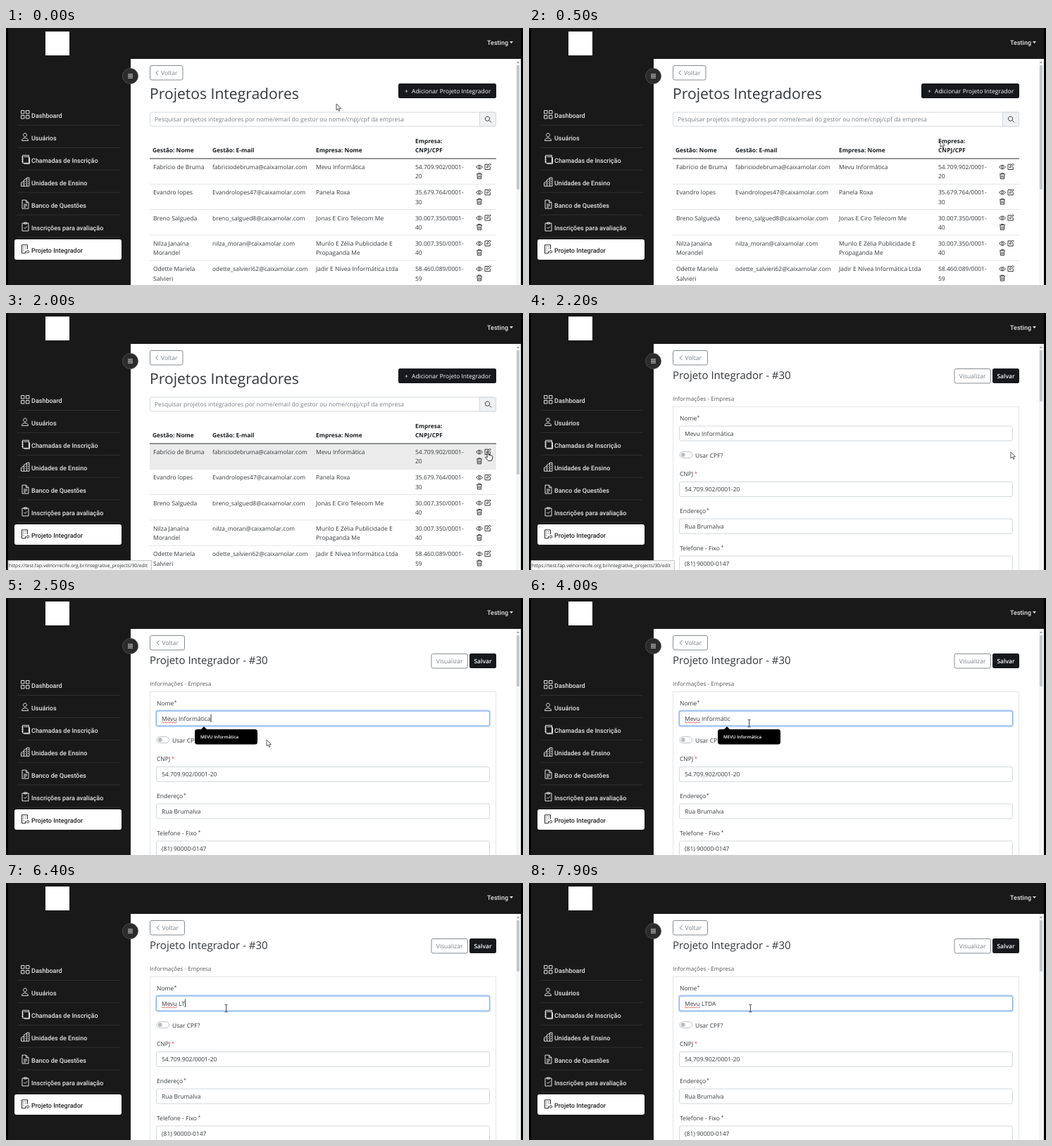
An HTML page that plays this animation: 734 px wide and 366 px high, repeating every 8 s.

```html
<!DOCTYPE html>
<html lang="pt-BR">
<head>
<meta charset="utf-8">
<title>Projetos Integradores</title>
<style>
html, body { margin: 0; width: 100%; height: 100%; overflow: hidden; background: #000; }
svg { display: block; width: 734px; height: 366px; }
text { font-family: "Open Sans", "Noto Sans", sans-serif; font-size: 8.5px; fill: #33373b; white-space: pre; text-rendering: geometricPrecision; }
.side text { font-family: Roboto, sans-serif; font-size: 9px; font-weight: 500; fill: #e6e6e6; }
.side text.on { fill: #222; }
.b { font-weight: 700; font-size: 8.4px; fill: #1c1f22; }
.w { fill: #fff; }
.g { fill: #777e84; }
.ico { fill: none; stroke: #e2e2e2; stroke-width: 1; }
.ico.on, .act { stroke: #222; }
.act { fill: none; stroke-width: .9; }
.box { fill: #fff; stroke: #d3d8dd; }
.btn { fill: #fff; stroke: #868d93; }
</style>
</head>
<body>
<svg id="stage" viewBox="0 0 734 366"></svg>
<script>
const LOOP = 8000;
const NAME = 'Mevu Informática';
const PITCH = 36.3, ROW_TOP = 186;

const text = (x, y, str, cls = '', attrs = '') =>
  `<text x="${x}" y="${y}" class="${cls}" ${attrs}>${str}</text>`;
const size = n => `style="font-size:${n}px"`;
const rect = (x, y, w, h, attrs) =>
  `<rect x="${x}" y="${y}" width="${w}" height="${h}" ${attrs}/>`;
const path = (d, attrs) => `<path d="${d}" ${attrs}/>`;

const menu = [
  ['Dashboard', 'M.5.5h4.5v4.5h-4.5zM7.5.5h4.5v4.5h-4.5zM.5 7.5h4.5v4.5h-4.5zM7.5 7.5h4.5v4.5h-4.5z'],
  ['Usuários', 'M6 1a2.5 2.5 0 1 0 .01 0zM1.5 11.5c0-5 9-5 9 0z'],
  ['Chamadas de Inscrição', 'M2.5.5h9v11h-9zM4.5 2.5h7M1 3h3M1 6h3M1 9h3M4.5 12.5h8v-9'],
  ['Unidades de Ensino', 'M.5 12.5v-5l4-2v7zM4.5 12.5v-9l4-2v11zM8.5 12.5v-12h3.5v12zM2 9h1M6 6h1M6 9h1M10 3h1M10 6h1M10 9h1'],
  ['Banco de Questões', 'M2 .5h5.500l3.500 3.500v8.500h-9zM7.500.5v3.500h3.500M4 6.500h5M4 8.500h5M4 10.500h3'],
  ['Inscrições para avaliação', 'M2 1.500h9v11h-9zM4.500.5h4v2h-4zM4.500 7.500l1.500 1.500 3-3'],
  ['Projeto Integrador', 'M1.500 12.500v-12h8v6M1.500 12.500h5v-3M3.500 3h1M6.500 3h1M3.500 5.500h1M6.500 5.500h1M3.500 8h1M10 8.500a1.700 1.700 0 1 0 .01 0z']
];

const rows = [
  ['Fabrício de Bruma', 'fabriciodebruma', 'Mevu Informática', '54.709.902/0001-', '20'],
  ['Evandro lopes', 'Evandrolopes47', 'Panela Roxa', '35.679.764/0001-', '30'],
  ['Breno Salgueda', 'breno_salgued8', 'Jonas E Ciro Telecom Me', '30.007.350/0001-', '40'],
  ['Nilza Janaína|Morandel', 'nilza_moran', 'Murilo E Zélia Publicidade E|Propaganda Me', '30.007.350/0001-', '40'],
  ['Odette Mariela|Salvieri', 'odette_salvieri62', 'Jadir E Nívea Informática Ltda', '58.460.089/0001-', '59']
];

function frame() {
  const items = menu.map(([label, d], i) => {
    const y = 125 + i * 31.9, on = i === 6 ? 'on' : '';
    return (on ? rect(12, 301, 152, 29, 'rx="3" fill="#fff"') : rect(16, y + 13, 146, 1, 'fill="#303030"')) +
      path(d, `class="ico ${on}" transform="translate(21 ${y - 8})"`) + text(36, y + 3.3, label, on);
  }).join('');
  return rect(3, 0, 728, 366, 'fill="#191919"') + rect(177, 44, 554, 322, 'fill="#fff"') +
    rect(56, 5, 34, 34, 'fill="#fff"') +
    `<g class="side">${text(713, 24, 'Testing', '', 'text-anchor="end"')}${items}</g>` +
    path('M715 19h5l-2.500 3z', 'fill="#e6e6e6"') +
    '<circle cx="176.500" cy="68.500" r="11" fill="#2b2b2b" stroke="#555" stroke-width=".8"/>' +
    path('M173 66h7M173 68.500h7M173 71h7', 'stroke="#eee" stroke-width="1"') +
    rect(724, 44, 7, 322, 'fill="#f4f5f6"') + path('M725 50l2-2.500 2 2.500z', 'fill="#999"') +
    rect(725, 53, 4, 177, 'id="thumb" rx="1" fill="#c3c8cf"');
}

const back = (w, x) => rect(204.5, 53.5, w, 20.5, 'rx="2.500" class="btn"') +
  path(`M${x} 60.500l-3.200 3.300 3.200 3.300`, 'fill="none" stroke="#777e84"') + text(x + 4, 67, 'Voltar', 'g');

function rowIcons(y) {
  return `<g class="act" transform="translate(0 ${y})">` +
    path('M667.500 12q4.500-5.500 9 0q-4.500 5.500-9 0zM672 10.600a1.400 1.400 0 1 0 .01 0z', '') +
    path('M685 8.200h-5v7.300h7.300v-4M682.500 13l.4-1.800 4-4 1.300 1.300-4 4z', '') +
    path('M668 22h8M670.500 22v-1.200h3v1.200M669 22.500l.4 6.300h5.200l.4-6.300M671 24v3.500M673 24v3.500', '') + '</g>';
}

function listPage() {
  const body = rows.map(([who, mail, firm, id, tail], i) => {
    const y = ROW_TOP + i * PITCH;
    const lines = (x, str) => str.split('|').map((s, k) => text(x, y + 15 + k * 13.4, s)).join('');
    return lines(209, who) + text(293, y + 15, mail + '@caixamolar.com', '', size(8.4)) + lines(440, firm) +
      lines(581, id + '|' + tail) + rowIcons(y) +
      rect(204, y + PITCH - .4, 492, .8, 'fill="#dcdfe2"');
  }).join('');
  return back(46.5, 216) + text(204, 101, 'Projetos Integradores', '', size(21.1)) +
    rect(557, 79, 139, 21, 'rx="2.500" fill="#16181b"') + text(566, 93, '+', 'w') +
    text(576, 93, 'Adicionar Projeto Integrador', 'w') +
    rect(204.5, 120, 491, 20, 'rx="2.500" class="box"') +
    path('M672.500 120h20.500a2.500 2.500 0 0 1 2.500 2.500v15a2.500 2.500 0 0 1-2.500 2.500h-20.500z', 'fill="#f0f1f2" stroke="#d3d8dd"') +
    path('M683.500 126a3.200 3.200 0 1 0 .01 0zM686 131.500l3 3', 'class="act"') +
    text(211, 133, 'Pesquisar projetos integradores por nome/email do gestor ou nome/cnpj/cpf da empresa', 'g') +
    text(208, 177, 'Gestão: Nome', 'b') + text(293, 177, 'Gestão: E-mail', 'b') + text(440, 177, 'Empresa: Nome', 'b') +
    text(581, 164, 'Empresa:', 'b') + text(581, 177, 'CNPJ/CPF', 'b') +
    rect(204, ROW_TOP, 492, PITCH, 'id="hover" fill="#ebebeb"') +
    rect(204, 185.5, 492, 1, 'fill="#2a2d30"') + body;
}

function editPage() {
  const field = (label, y, w, star, value) => text(214, y, label) + text(214 + w, y - 1.500, '*', '', `style="font-size:7px;fill:${star}"`) +
    rect(213.5, y + 8.500, 473, 21, 'rx="2.500" class="box"') + text(221, y + 22, value);
  return back(49, 217.500) + text(204, 94, 'Projeto Integrador - #30', '', size(15)) +
    rect(604, 79.5, 51.5, 20.5, 'rx="2.500" class="btn"') + text(629.7, 93, 'Visualizar', 'g', 'text-anchor="middle"') +
    rect(658, 79, 38, 21, 'rx="2.500" fill="#16181b"') + text(677, 93, 'Salvar', 'w', 'text-anchor="middle" font-weight="600"') +
    text(204, 125, 'Informações - Empresa', '', 'style="font-size:8.1px;fill:#555"') +
    rect(204.5, 133.5, 491, 260, 'fill="none" stroke="#e3e5e7"') +
    rect(211.8, 159, 476.4, 25, 'id="glow" rx="4" fill="#c6dcfb"') +
    field('Nome', 152.500, 24.500, '#444', '') +
    rect(213.5, 161, 473, 21, 'id="ring" rx="2.500" fill="none" stroke="#7fb0f2"') +
    '<text id="value" x="221" y="174.500"></text>' +
    path('M221 177.300' + 'q1 -1.300 2 0t2 0'.repeat(5) + 'q1 -1.300 2 0', 'id="wave" fill="none" stroke="#e0504a" stroke-width=".8"') +
    rect(0, 165.500, .9, 11.500, 'id="caret" fill="#222"') +
    rect(214, 197.500, 17.500, 9, 'rx="4.500" fill="#fff" stroke="#bfc3c7"') + '<circle cx="218.700" cy="202" r="3" fill="#b9bdc1"/>' +
    text(236, 205.5, 'Usar CPF?') +
    field('CNPJ', 232, 21, '#d33', '54.709.902/0001-20') +
    field('Endereço', 284.700, 38, '#444', 'Rua Brumalva') +
    field('Telefone - Fixo', 337.500, 58.500, '#444', '(81) 90000-0147') +
    '<g id="tip">' + rect(268, 187, 89, 21.5, 'rx="3.500" fill="#000"') + path('M276 188l5-5 5 5z', '') +
    text(276, 200, 'MEVU Informática', 'w', 'style="font-size:6.2px;font-weight:600"') + '</g>';
}

const status = '<g id="status">' + rect(3, 352.5, 203.500, 14, 'fill="#f6f6f6" stroke="#bbb" stroke-width=".8"') +
  text(4, 362, 'https://test.fap.velnorrecife.org.br/integrative_projects/30/edit', '', size(6.8)) + '</g>';

const pointers =
  path('M0 0v9l2.100-1.900 1.500 3.200 1.500-.7-1.500-3h2.900z', 'id="arrow" fill="#fff" stroke="#333" stroke-width=".8"') +
  path('M-.8 0q.9-1 1.800 0v4l5 1.200q1 .4.9 1.500l-.8 4.300q-.2 1.500-1.500 1.500h-3.800l-4-4.500q0-1.500 1.500-1l.9.8z', 'id="hand" fill="#fff" stroke="#222" stroke-width=".9"') +
  path('M-2-5.200h1.500l.5.600.500-.600h1.500M0-4.600v9.200M-2 5.200h1.500l.5-.600.500.600h1.500', 'id="beam" fill="none" stroke="#333" stroke-width=".9"');

document.getElementById('stage').innerHTML = frame() +
  `<g id="list">${listPage()}</g><g id="edit">${editPage()}</g>` + status + pointers;

const $ = id => document.getElementById(id);
const show = (id, on) => $(id).setAttribute('visibility', on ? 'inherit' : 'hidden');
const within = (t, spans) => spans.some(([a, b]) => t >= a && t < b);

// time, x, y of the pointer tip
const route = [
  [0, 469, 108], [1000, 699, 213], [1500, 685, 198], [1900, 685, 198], [2000, 684, 198],
  [2400, 684, 198], [2500, 370, 202], [2800, 312, 180], [2900, 312, 180], [3100, 312.6, 178.5],
  [7800, 312.6, 178.5], [7900, 314.4, 178.5], [LOOP, 314.4, 178.5]
];
const erase = [4000, 4100, 4200, 4300, 4400, 4600, 4900, 5000, 5200, 5400, 5500];
const type = [6000, 6200, 6800, 6900];
const caretOn = [[2500, 3600], [4100, 4600], [5200, 5700], [6000, 7500]];
const passed = (t, times) => times.filter(s => t >= s).length;

function pointer(t) {
  const i = route.findIndex(p => p[0] > t) - 1;
  const [a, ax, ay] = route[i], [b, bx, by] = route[i + 1];
  const u = (t - a) / (b - a), e = u * u * (3 - 2 * u);
  return [ax + (bx - ax) * e, ay + (by - ay) * e];
}

function draw(now) {
  const t = Math.floor(now % LOOP / 100) * 100;
  const editing = t >= 2200, focused = t >= 2500;
  const [x, y] = pointer(t);
  const kind = t >= 1400 && !editing ? 'hand' : t >= 2700 ? 'beam' : 'arrow';
  for (const id of ['arrow', 'hand', 'beam']) {
    show(id, id === kind);
    $(id).setAttribute('transform', `translate(${x} ${y})`);
  }
  show('list', !editing);
  show('edit', editing);
  show('status', t >= 1500 && t < 2300);
  $('thumb').setAttribute('height', editing ? 73 : 177);

  show('hover', !editing && x < 696 && y >= ROW_TOP && y < ROW_TOP + PITCH);

  for (const id of ['glow', 'ring', 'wave']) show(id, editing && focused);
  show('tip', focused && t < 6100);
  const value = NAME.slice(0, NAME.length - passed(t, erase)) + 'LTDA'.slice(0, passed(t, type));
  $('value').textContent = value;
  const caret = within(t, caretOn);
  show('caret', caret);
  if (caret) $('caret').setAttribute('x', 221 + $('value').getComputedTextLength());
}

function loop() {
  draw(performance.now());
  requestAnimationFrame(loop);
}
loop();
</script>
</body>
</html>
```
